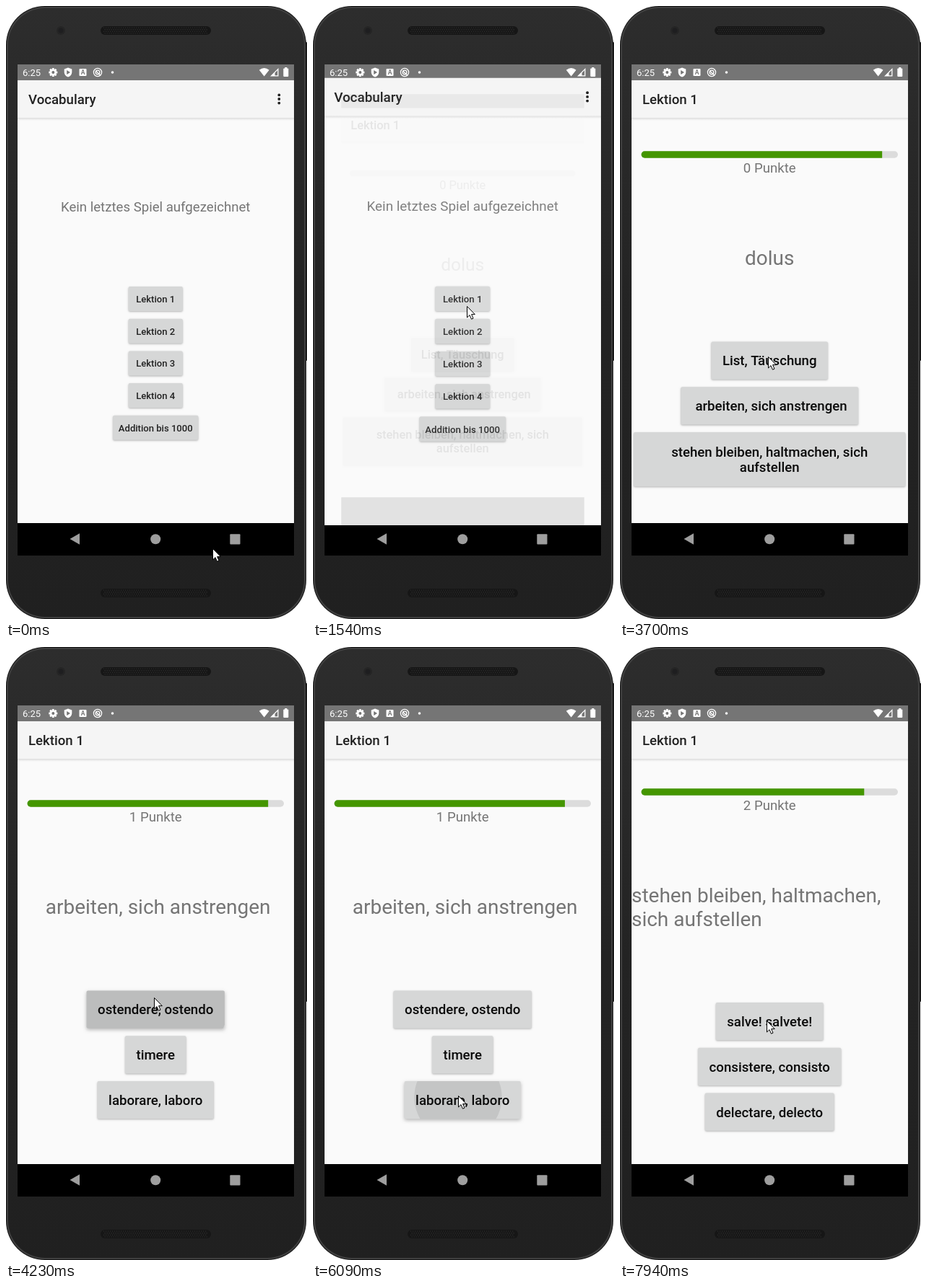
Write an HTML page with a canvas that moves like this. It is 417x850 px and loops after 8000 ms.

```html
<!DOCTYPE html>
<html lang="de">
<head>
<meta charset="utf-8">
<title>Vocabulary</title>
<style>
html, body { margin: 0; width: 100%; height: 100%; overflow: hidden; background: #fff; }
canvas { display: block; }
</style>
</head>
<body>
<canvas id="stage" width="417" height="850"></canvas>
<script>
const W = 417, H = 850, LOOP = 8000, MID = 207.2, CENTER_Y = 421.5;
const SMALL = 13.05, BODY = 18.64, LARGE = 27.96;
const stage = document.getElementById('stage').getContext('2d');
const layer = document.createElement('canvas');
layer.width = W;
layer.height = H;
let c = stage;

const clamp = v => Math.max(0, Math.min(1, v));
const smooth = u => u * u * (3 - 2 * u);

// Pointer moves: start, end, goal x, goal y
const moves = [
  [70, 600, 229, 402], [810, 850, 216, 390], [1010, 1100, 213, 416], [1620, 1850, 217, 409],
  [2080, 2520, 215, 470], [2850, 3200, 172, 530], [3200, 3700, 205, 486], [4630, 4950, 190, 446],
  [4950, 5400, 190, 521], [5480, 5850, 201, 622], [6780, 7170, 189, 580], [7700, 7940, 203, 518]
];

const questions = [
  { from: 0, dy: 0, top: 465.5, ask: ['dolus'],
    answers: [['List, Täuschung'], [' arbeiten, sich anstrengen'], ['stehen bleiben, haltmachen, sich', 'aufstellen']] },
  { from: 4190, dy: 11, top: 476.5, ask: [' arbeiten, sich anstrengen'],
    answers: [['ostendere, ostendo'], ['timere'], ['laborare, laboro']] },
  { from: 6210, dy: -5, top: 493, ask: ['stehen bleiben, haltmachen,', 'sich aufstellen'],
    answers: [['salve! salvete!'], ['consistere, consisto'], ['delectare, delecto']] }
];

function pointerAt(t) {
  return moves.reduce(([x, y], [start, end, goalX, goalY]) => {
    const u = smooth(clamp((t - start) / (end - start)));
    return [x + (goalX - x) * u, y + (goalY - y) * u];
  }, [286, 752]);
}

// Countdown: one percent per tick, empty until the timer runs
function barWidth(t) {
  const ticks = Math.max(0, Math.floor((t - 1786) / 615));
  return t < 1600 ? 0 : 3.555 * (97 - ticks);
}

function rect(x, y, w, h, color, r = 0) {
  c.fillStyle = color;
  c.beginPath();
  c.roundRect(x, y, w, h, r);
  c.fill();
}

function dot(x, y, r, color) {
  c.fillStyle = color;
  c.beginPath();
  c.arc(x, y, r, 0, 7);
  c.fill();
}

function ring(x, y, r) {
  c.strokeStyle = '#fff';
  c.lineWidth = 1.3;
  c.beginPath();
  c.arc(x, y, r, 0, 7);
  c.stroke();
}

function shape(path, color, x = 0, y = 0) {
  c.save();
  c.translate(x, y);
  c.fillStyle = color;
  c.fill(new Path2D(path));
  c.restore();
}

function text(str, x, y, size, color, weight = 400, align = 'center') {
  c.font = `${weight} ${size}px Roboto, sans-serif`;
  c.textAlign = align;
  c.fillStyle = color;
  c.fillText(str, x, Math.round(y));
}

function vertical(y0, y1, ...colors) {
  const g = c.createLinearGradient(0, y0, 0, y1);
  colors.forEach((color, i) => g.addColorStop(i / (colors.length - 1), color));
  return g;
}

// Touch ripple started at `start` and gone at `end`
function ripple(t, start, end, x, y) {
  const age = t - start;
  if (age < 0 || t > end) return null;
  return { x, y, r: age * 0.43, a: Math.min(0.12, age / 1600, (end - t) / 1300) };
}

function button(lines, y, size, ink) {
  const big = size === BODY, lead = 21.8, extra = lines.length - 1;
  c.font = `500 ${size}px Roboto, sans-serif`;
  const textW = Math.max(...lines.map(s => c.measureText(s).width));
  const w = extra ? 376.5 : Math.max(textW + (big ? 31 : 15.5), 75);
  const h = (big ? 52.2 : 34) + extra * 23;
  const x = MID - w / 2;
  c.save();
  c.shadowColor = 'rgba(0,0,0,.28)';
  c.shadowBlur = ink ? 5 : 2.5;
  c.shadowOffsetY = ink ? 2 : 1;
  rect(x, y, w, h, '#d6d7d7', 2);
  c.restore();
  if (ink) {
    c.save();
    c.beginPath();
    c.roundRect(x, y, w, h, 2);
    c.clip();
    dot(ink.x, ink.y, ink.r, `rgba(0,0,0,${ink.a})`);
    c.restore();
  }
  const first = y + h / 2 + size * 0.37 - extra * lead / 2;
  lines.forEach((s, i) => text(s, MID, first + i * lead, size, big ? '#0a0a0a' : '#222', 500));
}

function windowFrame(title) {
  rect(16, 81, 383, 681, '#fafafa');
  rect(16, 155, 383, 4, vertical(155, 159, '#dcdcdc', '#fafafa'));
  rect(16, 103, 383, 52, '#f5f5f5');
  rect(16, 81, 383, 22, '#757575');
  rect(16, 717, 383, 45, '#000');
  text(title, 31, 136, BODY, '#212121', 500, 'left');
}

function home(t) {
  windowFrame('Vocabulary');
  for (let i = -1; i < 2; i++) dot(378.3, 129 + i * 5.6, 1.9, '#212121');
  text('Kein letztes Spiel aufgezeichnet', MID, 285, BODY, '#757575');
  for (let i = 0; i < 5; i++) {
    const ink = i ? null : ripple(t, 1120, 1480, 213, 416);
    button([i < 4 ? `Lektion ${i + 1}` : 'Addition bis 1000'], 389 + i * 44.7, SMALL, ink);
  }
}

function quiz(t) {
  const n = questions.findLastIndex(q => t >= q.from);
  const { dy, top, ask, answers } = questions[n];
  windowFrame('Lektion 1');

  c.save();
  c.beginPath();
  c.roundRect(29.5, 201.3 + dy, 355.5, 9.4, 4.7);
  c.clip();
  rect(29, 201 + dy, 357, 10, '#dcdcdc');
  rect(29, 201 + dy, barWidth(t), 10, '#449600');
  c.restore();
  text(`${n} Punkte`, MID, 231 + dy, BODY, '#757575');

  const wrapped = ask.length > 1;
  ask.forEach((s, i) =>
    text(s, wrapped ? 16 : MID, 359 + dy + i * 33, LARGE, '#757575', 400, wrapped ? 'left' : 'center'));

  const inks = [ripple(t, 3990, 4460, 206, 487), null, ripple(t, 5950, 6400, 201, 624)];
  answers.forEach((a, i) => button(a, top + i * 62.8, BODY, inks[i]));
}

function zoomed(scale, draw) {
  c.save();
  c.translate(MID, CENTER_Y);
  c.scale(scale, scale);
  c.translate(-MID, -CENTER_Y);
  draw();
  c.restore();
}

function grille(y) {
  rect(131, y, 153, 12, '#161616', 6);
  for (let row = 0; row < 4; row++)
    for (let i = 0; i < 48; i++)
      rect(135 + i * 3 + row % 2 * 1.5, y + 1.5 + row * 2.6, 1.3, 1.3, '#2c2c2c');
}

function phone() {
  rect(0, 0, W, H, '#fff');
  rect(413, 50, 4, 442, '#1a1a1a', 1);
  rect(0, 0, 416, H, '#151515', 54);
  rect(1, 1, 414, H - 2, '#3f3f3f', 53);
  rect(3, 3, 410, H - 6, vertical(0, H, '#2d2d2d', '#232323', '#202020'), 51);
  grille(28);
  grille(808);
  dot(76, 34, 6, '#252525');
  dot(76, 34, 3.5, '#1e1e20');
}

function systemIcons() {
  text('6:25', 23, 97, SMALL, '#fff', 400, 'left');
  for (let i = 0; i < 4; i++) {
    c.save();
    c.translate(65.3, 92);
    c.rotate(i * Math.PI / 4);
    rect(-1.4, -6, 2.8, 12, '#fff', 0.5);
    c.restore();
  }
  dot(65.3, 92, 4.5, '#fff');
  dot(65.3, 92, 2, '#757575');
  shape('M0-6.5 5.3-4.5V0Q5 4.8 0 6.5-5 4.8-5.3 0V-4.5Z', '#fff', 86, 92);
  shape('M-1.8-3 3 0-1.8 3Z', '#757575', 86, 92);
  rect(101.5, 87, 10, 10, '#fff', 1);
  text('A', 106.5, 95, 8.5, '#757575', 700);
  ring(127, 92, 5.6);
  ring(127, 92, 2.8);
  shape('M125 89.4 131.4 95.8 130.4 96.8 124 90.4Z', '#fff');
  dot(147.5, 92, 1.8, '#fff');
  shape('M357.7 97.5 350.8 88.8Q357.7 83.2 364.6 88.8Z', '#fff');
  shape('M377.5 86V97.5H366ZM376.2 89 372.5 92.7V96.2H376.2Z', '#fff');
  rect(384.3, 86.5, 7, 11.5, '#fff', 1);
  rect(386.3, 85, 3, 2, '#fff');
  shape('M88.5 739 102 731.3V746.7Z', '#9e9e9e');
  dot(207.2, 739.3, 7, '#9e9e9e');
  rect(310.3, 732.2, 14.2, 14.2, '#9e9e9e', 1);
}

function pointer(t) {
  c.save();
  c.translate(...pointerAt(t));
  const arrow = new Path2D('M.5.5V16L4 12.6 6.5 18.2 9 17.1 6.6 11.6H11.3Z');
  c.fillStyle = '#fff';
  c.fill(arrow);
  c.strokeStyle = '#000';
  c.lineWidth = 1;
  c.stroke(arrow);
  c.restore();
}

function screen(t) {
  const p = smooth(clamp((t - 1440) / 360));
  const fade = clamp((t - 1531) / 110);
  c.save();
  c.beginPath();
  c.rect(16, 81, 383, 681);
  c.clip();
  if (p < 1) zoomed(1 + 0.055 * p, () => home(t));
  if (fade > 0) {
    c = layer.getContext('2d');
    c.clearRect(0, 0, W, H);
    zoomed(0.85 + 0.15 * p, () => quiz(t));
    c = stage;
    c.globalAlpha = fade;
    c.drawImage(layer, 0, 0);
  }
  c.restore();
}

function frame(now) {
  const t = now % LOOP;
  phone();
  screen(t);
  systemIcons();
  pointer(t);
  requestAnimationFrame(frame);
}
requestAnimationFrame(frame);
</script>
</body>
</html>
```
